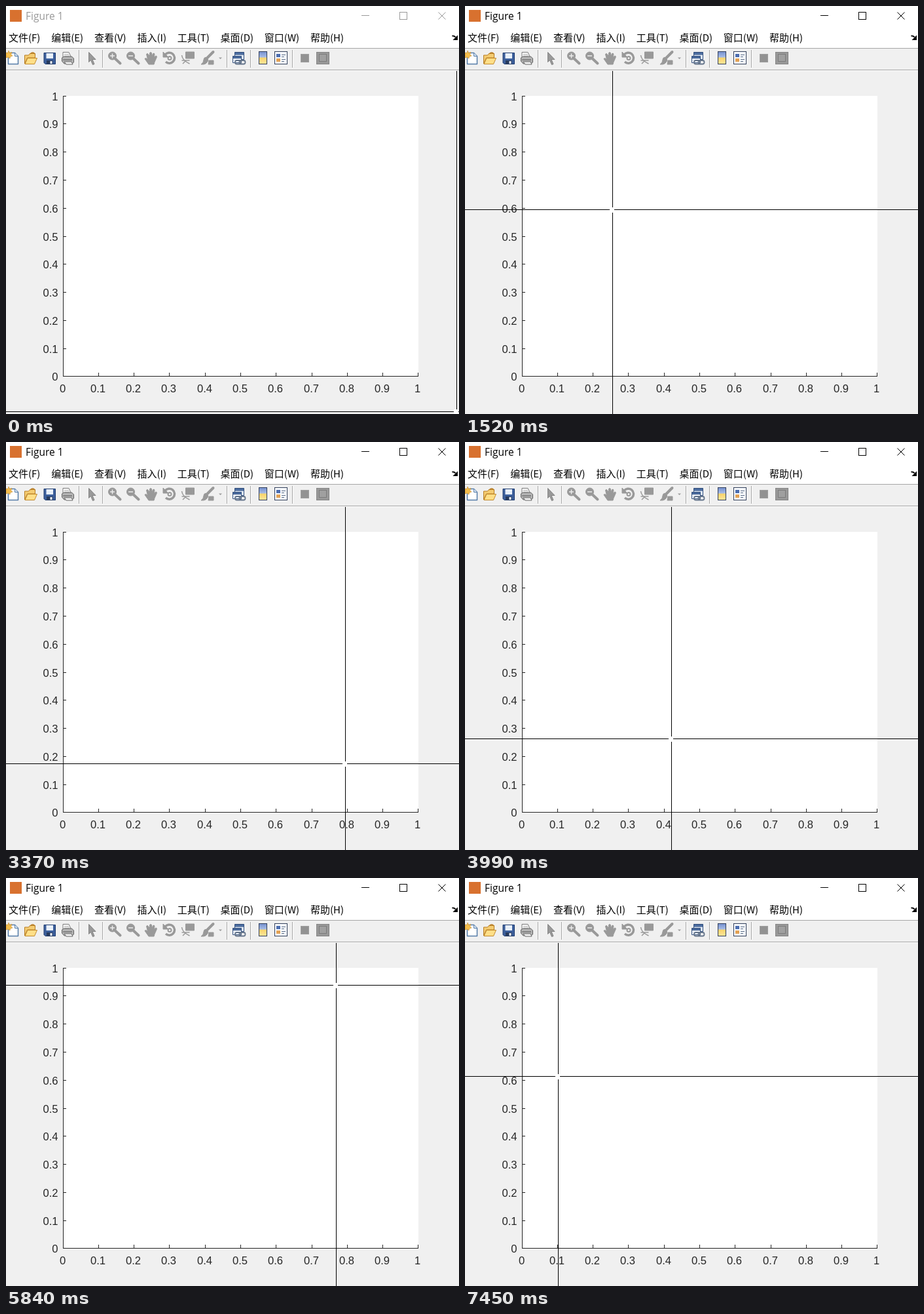
These frames come from a looping animation (692x622 px, 8000 ms). An HTML page:

```html
<!DOCTYPE html>
<html lang="zh">
<head>
<meta charset="utf-8">
<title>Figure</title>
<style>
  html, body { margin: 0; width: 100%; height: 100%; overflow: hidden; background: #f0f0f0; }
  svg { display: block; width: 692px; height: 622px; }
  .crisp { shape-rendering: crispEdges; }
  .menu { font: 15px "Noto Sans CJK SC", "Noto Sans CJK", sans-serif; word-spacing: 13.4px; }
  .title { font: 15.5px "Open Sans", "Noto Sans", sans-serif; fill: currentColor; }
  .labels { font: 16.6px "Liberation Sans", Arial, sans-serif; fill: #262626; }
  #frame { color: #999; }
  #frame.active { color: #000; }
</style>
</head>
<body>
<svg viewBox="0 0 692 622">
  <rect width="692" height="622" fill="#f0f0f0"/>
  <rect width="692" height="64" fill="#fff"/>

  <rect x="6" y="6" width="18" height="18" fill="#d8712f"/>
  <g id="frame">
    <text class="title" x="30" y="21">Figure 1</text>
    <g fill="none" stroke="currentColor">
      <path class="crisp" d="M543 14.5h12M601.5 9.5h11v11h-11z"/>
      <path d="M660.500 9.500l11 11M671.500 9.500l-11 11"/>
    </g>
  </g>
  <text class="menu" x="4" y="54">文件(F) 编辑(E) 查看(V) 插入(I) 工具(T) 桌面(D) 窗口(W) 帮助(H)</text>
  <path d="M681.500 45.500q4 0 5 2" fill="none" stroke="#000" stroke-width="2"/>
  <path d="M690 44.500v7.500h-7.500z"/>

  <g class="crisp">
    <path d="M0 64.500H692M0 97.500H692" stroke="#a6a6a6"/>
    <path d="M0 98.500H692" stroke="#fff"/>
    <g id="seps"></g>
  </g>

  <!-- file tools -->
  <g stroke-linejoin="round">
    <path d="M3.500 71.500h10l5 5v12h-15z" fill="#fff" stroke="#547ba8" stroke-width="1.500"/>
    <path d="M13.500 71.500v5h5" fill="#dbe8f5" stroke="#547ba8"/>
    <path d="M4 68l1.500 3.500 3.500-1-1.500 3.500 2.500 2-3.500 1-.5 3-3-2-3 1V71l3 .5z" fill="#f4bd4c" stroke="#c58927" stroke-width=".6"/>

    <path d="M28.500 88V75h6l2-2.500h8V79h-12z" fill="#f4cc72" stroke="#b77d24"/>
    <path d="M29 88.500l4-9h14.500l-4 9z" fill="#ffdf88" stroke="#c28a2d"/>
    <path d="M37 73q4-4 7 0" fill="none" stroke="#b77d24" stroke-width="1.500"/>

    <path d="M58 71.500h17.500v17H60l-2-2z" fill="#3c5f9b" stroke="#233f72"/>
    <path d="M61.500 72h10.500v8h-10.500z" fill="#e8f0fa"/>
    <path d="M62 83h9.500v5.500H62z" fill="#283b5c"/>
    <path d="M67.500 84h3v4h-3z" fill="#edf2f8"/>

    <path d="M87 79V70.500h9l4 8.500z" fill="#fff" stroke="#777"/>
    <path d="M89 73.500h7M89 76h8" stroke="#aaa"/>
    <path d="M85.500 79l3-2h12l3 3v6l-3 2H89l-3.500-4z" fill="#b4b4b4" stroke="#606060"/>
    <path d="M87 82h14" stroke="#555"/>
    <path d="M89 85h11l2 4H92z" fill="#f5f5f5" stroke="#666"/>
  </g>

  <!-- disabled plot tools -->
  <g fill="#999" stroke="#999">
    <path d="M126.500 70.500l10.500 11h-5l3 7-2.500 1-3-7-3 3z" stroke="#858585"/>
    <g id="lens">
      <circle cx="162.500" cy="76" r="6"/>
      <path d="M167 80.500l7.500 7" stroke-width="4" stroke-linecap="round"/>
      <path d="M159 76h7" stroke="#eee" stroke-width="1.500"/>
    </g>
    <use href="#lens" x="28"/>
    <path d="M162.500 72.500v7" stroke="#eee" stroke-width="1.500"/>
    <path d="M218 89l-6-8.500q1-2 3.500 0l1 1-2-8q1-2 3 0l2 4v-6q1.500-2 3 0v6l2-5q2-1 2.500.5l-1 6 2.500-3q2 0 2 1.500l-3.500 8-1 3.500z"/>
    <g fill="none" stroke-width="3.500">
      <path d="M243 74.500a8 8 0 1 1 1 10.500"/>
      <circle cx="250" cy="79.500" r="2.500" stroke-width="2"/>
    </g>
    <path d="M240 70v8h8z"/>
    <path d="M274.500 70h13v10h-13z"/>
    <path d="M268.500 75q1 8 12 13M268.500 83h12M275 83l-5 5" fill="none" stroke-width="1.500"/>
    <path d="M316.500 70l-10 10" stroke-width="4" stroke-linecap="round"/>
    <path d="M305 78l4 4q-2 8-11 7 4-3 4-7 0-3 3-4z"/>
    <path d="M310 83h7v6h-8z"/>
    <path d="M325 78.500h5l-2.500 2.500z" stroke="none"/>
  </g>

  <!-- link, colour bar, legend -->
  <defs>
    <linearGradient id="bar" x2="0" y2="1">
      <stop stop-color="#7590cf"/><stop offset=".45" stop-color="#a7bce5"/>
      <stop offset=".5" stop-color="#f9d36b"/><stop offset="1" stop-color="#ffe79b"/>
    </linearGradient>
  </defs>
  <g stroke="#36527f">
    <path d="M349.500 70.500h14v11h-14z" fill="#dce7f6"/>
    <path d="M349.500 71h14v3h-14z" fill="#5276ad"/>
    <path d="M346.500 76.500h13v10h-13z" fill="#edf3fb"/>
    <path d="M346.500 77h13v2.500h-13z" fill="#5276ad"/>
    <g fill="none" stroke="#65758b" stroke-width="1.800">
      <rect x="350" y="83" width="9" height="5.500" rx="2.500"/>
      <rect x="356.500" y="83" width="9" height="5.500" rx="2.500"/>
    </g>
    <path class="crisp" d="M386.500 69.500h12v19h-12z" fill="url(#bar)" stroke="#34415c"/>
    <path class="crisp" d="M410.500 69.500h19v19h-19z" fill="#f8fbff" stroke="#34415c"/>
  </g>
  <g class="crisp">
    <path d="M413 73h6v5h-6z" fill="#4c6db0"/>
    <path d="M413 80h6v5h-6z" fill="#e2a154"/>
    <path d="M421 74.500h6M421 77.500h4M421 81.500h6M421 84.500h4" stroke="#596a83"/>
    <path d="M450.500 73.500h12v12h-12z" fill="#929292" stroke="#a0a0a0"/>
    <path d="M474.500 70.500h19v18h-19z" fill="#999" stroke="#858585"/>
    <path d="M478.500 73.500h11v11h-11z" fill="#a0a0a0" stroke="#7b7b7b"/>
  </g>

  <!-- axes -->
  <rect x="87" y="137" width="543" height="428" fill="#fff"/>
  <path id="axes" class="crisp" fill="none" stroke="#262626"/>
  <g id="labels" class="labels"></g>

  <g class="crisp">
    <rect id="hLine" width="692" height="1"/>
    <rect id="vLine" y="99" width="1" height="523"/>
    <rect id="gap" width="7" height="8" fill="#fff"/>
  </g>
</svg>
<script>
const $ = id => document.getElementById(id);
const LOOP = 8000, STEP = 77.1, LEAD = 32, ACTIVE = 16;

$('seps').innerHTML = [112, 148, 338, 374, 438].map(x =>
  `<path d="M${x - .5} 67v27" stroke="#a6a6a6"/><path d="M${x + .5} 67v27" stroke="#fff"/>`).join('');

const label = (x, y, s, anchor) => `<text x="${x}" y="${y}" text-anchor="${anchor}">${s}</text>`;
let axes = 'M87.5 137V565M87 564.5H630', labels = '';
for (let i = 0; i <= 10; i++) {
  const x = Math.round(86.7 + 54.26 * i), y = Math.round(564.4 - 42.77 * i);
  axes += `M${x + .5} 565v-6M87 ${y + .5}h5`;
  labels += label(x - .5, 589, i / 10, 'middle') + label(79.5, y + 7, i / 10, 'end');
}
$('axes').setAttribute('d', axes);
$('labels').innerHTML = labels;

// Pointer key points: redraw step, x, y; repeated places are rests
const keys = [
  [0, 688, 618], [9, 157, 511], [20, 225, 310], [21, 225, 310], [32, 559, 517],
  [36, 518, 490], [45, 518, 490], [52, 315, 452], [63, 582, 325], [65, 590, 308],
  [66, 590, 308], [76, 504, 163], [83, 497, 160], [94, 142, 302], [104, 142, 302]
];

const slope = (i, k) => (keys[i + 1][k] - keys[i][k]) / (keys[i + 1][0] - keys[i][0]);
function tangent(i, k) {
  if (!i) return slope(0, k);
  if (i === keys.length - 1) return 0;
  const a = slope(i - 1, k), b = slope(i, k);
  return a * b > 0 ? 2 * a * b / (a + b) : 0;
}
// Monotone cubic interpolation
function at(n, k) {
  const i = keys.findLastIndex(p => p[0] <= n);
  const h = keys[i + 1][0] - keys[i][0], u = (n - keys[i][0]) / h, v = 1 - u;
  return Math.round(keys[i][k] * (1 + 2 * u) * v * v + keys[i + 1][k] * u * u * (3 - 2 * u)
    + h * u * v * (tangent(i, k) * v - tangent(i + 1, k) * u));
}

const start = performance.now();
function draw(now) {
  const time = Math.max(0, now - start) % LOOP;
  const n = Math.floor((time + LEAD) / STEP);
  const x = at(n, 1), y = at(n, 2);
  $('hLine').setAttribute('y', y);
  $('vLine').setAttribute('x', x);
  $('gap').setAttribute('x', x - 4);
  $('gap').setAttribute('y', y - 3);
  $('frame').classList.toggle('active', n >= ACTIVE);
  requestAnimationFrame(draw);
}
draw(start);
</script>
</body>
</html>
```
